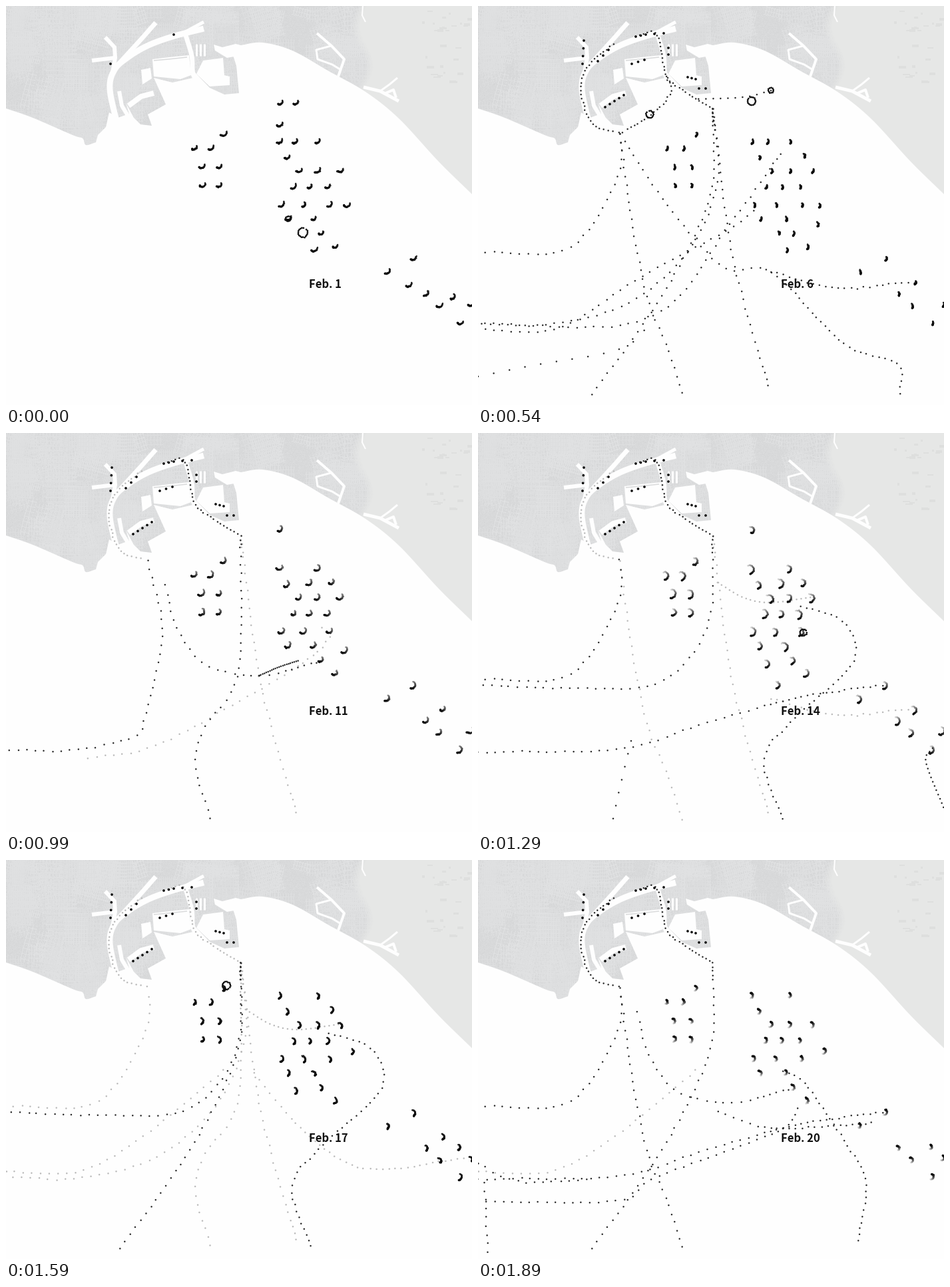
Animation of 700x600 px, one loop 2030 ms. Source, as a matplotlib script:

```python
import numpy as np
import matplotlib.pyplot as plt
from matplotlib.animation import FuncAnimation
from matplotlib.patches import Polygon

W, H, DPI = 700, 600, 100
PT = 72 / DPI
LOOP, STEP = 2030, 10
SEA, LAND = "#fefefe", "#d9dadb"
BLACK, DARK, FAINT = .04, .16, .73

plt.rcParams["toolbar"] = "None"
fig = plt.figure(figsize=(W / DPI, H / DPI), dpi=DPI, facecolor=SEA)
ax = fig.add_axes([0, 0, 1, 1])
ax.axis("off")


def spline(points, steps=12):
    """Smooth Catmull-Rom curve through the points."""
    p = np.array(points, float)
    p = np.vstack([2 * p[0] - p[1], p, 2 * p[-1] - p[-2]])
    t = np.linspace(0, 1, steps)[:, None]
    return np.vstack([.5 * (2 * b + (c - a) * t + (2 * a - 5 * b + 4 * c - d) * t**2
                            + (3 * b - a - 3 * c + d) * t**3)
                      for a, b, c, d in zip(p, p[1:], p[2:], p[3:])])


# ---- map -------------------------------------------------------------
def area(color, *points):
    return ax.add_patch(Polygon(points, closed=True, fc=color, ec="none"))


def stroke(width, *points, color=SEA):
    ax.plot(*zip(*points), color=color, lw=width * PT,
            solid_capstyle="butt", solid_joinstyle="round")


def street_texture():
    rng = np.random.default_rng(4)
    y, x = np.mgrid[:290, :W]
    tone = 216.5 + rng.normal(0, 1.8, x.shape)
    for _ in range(330):
        cx, cy = rng.uniform(0, 545), rng.uniform(0, 215)
        w, h = rng.uniform(6, 32, 2)
        angle = rng.choice([0, 0, 0, .25, -.3])
        u = (x - cx) * np.cos(angle) + (y - cy) * np.sin(angle)
        v = (y - cy) * np.cos(angle) - (x - cx) * np.sin(angle)
        gap = rng.integers(3, 7)
        lines = (u % gap < 1) | (v % (gap + 2) < 1)
        tone[(abs(u) < w) & (abs(v) < h) & lines] = rng.uniform(220, 225)
    plain = np.clip((x - 528 + 10 * np.sin(y / 19)) / 14, 0, 1)
    tone = tone * (1 - plain) + 230.5 * plain
    for _ in range(28):
        cx, cy = rng.integers(625, 695), rng.integers(5, 115)
        tone[cy:cy + rng.integers(2, 5), cx:cx + rng.integers(3, 12)] = 222
    rgb = np.stack([tone, tone + 1, tone + 2 - 2 * plain], -1)
    return rgb.clip(0, 255).astype(np.uint8)


west_coast = [(0, 154), (40, 168), (100, 194), (115, 199), (120, 209), (135, 205)]
port = [(138, 194), (150, 182), (155, 160), (168, 168), (185, 162), (180, 146), (192, 168),
        (202, 178), (219, 180), (213, 163), (240, 148), (222, 108), (250, 115), (281, 108),
        (284, 100), (306, 123), (328, 133), (350, 131), (346, 90), (340, 71)]
east_coast = [(352, 59), (385, 55), (430, 67), (485, 98), (540, 129), (590, 169),
              (650, 234), (700, 283)]
coast = area("none", (0, 0), *spline(west_coast), *port, *spline(east_coast), (700, 0))
ax.imshow(street_texture(), extent=(0, W, 290, 0), interpolation="nearest",
          aspect="auto").set_clip_path(coast)

# channels and basins of the port
stroke(9, *spline([(168, 182), (156, 125), (163, 96), (182, 78), (212, 60), (250, 46), (297, 34)]))
stroke(6, (160, 100), (164, 78), (163, 62), (149, 47))
stroke(6, (129, 82), (163, 78))
stroke(7, (172, 84), (203, 50), (225, 25))
stroke(5, (262, 43), (297, 24))
stroke(7, *spline([(270, 44), (279, 75), (282, 105), (300, 122)]))
for x in (286, 292, 298):
    stroke(3, (x, 57), (x, 75))
area(SEA, (220, 80), (245, 77), (275, 74), (278, 104), (262, 110), (222, 106))
stroke(1.5, (222, 82), (244, 80), (272, 77), color=LAND)
area(SEA, (203, 96), (217, 93), (219, 109), (205, 118))
stroke(8, (184, 150), (203, 136), (222, 131))
stroke(6, (170, 128), (174, 150), (185, 168))
area(SEA, (296, 82), (326, 78), (328, 104), (336, 106), (336, 119), (306, 121), (286, 102))
area(SEA, (312, 58), (325, 62), (345, 57), (357, 60), (353, 74), (332, 78), (314, 67))
# marinas on the eastern shore
stroke(4, (467, 41), (489, 60), (508, 80), (498, 109))
stroke(3, (488, 60), (466, 66), (468, 80), (490, 88), (503, 96))
stroke(5, (537, 122), (562, 128), (590, 143))
stroke(3, (562, 128), (576, 118), (588, 108))
stroke(4, (568, 132), (582, 126), (586, 138))
stroke(2, (536, 0), (535, 14), (540, 24))


# ---- sailing ships: dotted wakes along shared lanes --------------------
lanes = []


def lane(dark, faint, *points, gap=None):
    """A lane with the days on which its wake is dark or faint.

    Ships leave dots at even times, so dots crowd where ships are slow.
    """
    line = spline(points)
    x, y = line.T
    speed = gap or np.where((y < 188) & (x < 360), 6, np.where(x > 430, 9.5, 13))
    pace = np.broadcast_to(speed, x.shape)[1:]
    clock = np.r_[0, (np.hypot(np.diff(x), np.diff(y)) / pace).cumsum()]
    ticks = np.arange(0, clock[-1])
    dots = np.c_[np.interp(ticks, clock, x), np.interp(ticks, clock, y)]
    dots += np.random.default_rng(len(dots)).normal(0, .1 if gap else .6, dots.shape)
    lanes.append((dots, dark, faint))


HARBOUR_W, HARBOUR_E = (213, 192), (353, 155)
# in and out of the two harbour mouths
lane((3, 6, 20), (11, 14, 17), (203, 57), (165, 90), (155, 130), (172, 177), HARBOUR_W)
lane((3, 6, 11, 14, 20), (17,), (237, 46), (268, 42), (283, 105), (305, 125), HARBOUR_E)
lane((6, 14, 20), (17,), HARBOUR_W, (213, 245), (175, 325), (120, 370), (0, 370))
lane((6, 20), (14,), HARBOUR_W, (235, 350), (258, 450), (285, 515), (307, 583))
lane((3,), (), (240, 213), (278, 350), (270, 395), (210, 470), (206, 592))
lane((3,), (), HARBOUR_W, (245, 230), (268, 243), (335, 200), (345, 290), (270, 405),
     (118, 515), (72, 568), (83, 594))
lane((11,), (), HARBOUR_W, (235, 300), (208, 430), (195, 455), (110, 476), (0, 477))
lane((3, 6), (17,), HARBOUR_E, (360, 260), (322, 360), (230, 445), (110, 478), (0, 477))
lane((6, 17, 20), (), HARBOUR_E, (350, 280), (300, 395), (230, 505), (170, 585))
lane((14, 17), (), HARBOUR_E, (345, 290), (270, 376), (120, 383), (0, 379))
lane((11,), (17,), HARBOUR_E, (349, 360), (300, 440), (285, 500), (307, 580))
lane((6,), (11, 14, 17), HARBOUR_E, (372, 310), (390, 410), (438, 578))
lane((6,), (), (283, 105), (290, 130), (258, 165), HARBOUR_W)
lane((6,), (), HARBOUR_W, (285, 300), (370, 393), (440, 400), (550, 508), (630, 538), (634, 583))
# between the anchorages and the open sea
lane((11, 20), (), (240, 230), (255, 290), (300, 348), (380, 365), (475, 343))
lane((14, 20), (3,), (0, 480), (215, 475), (330, 440), (480, 398), (612, 379))
lane((14, 17), (), (485, 260), (550, 285), (563, 345), (480, 425), (430, 490), (458, 582))
lane((3,), (), (377, 317), (420, 380), (462, 398), (540, 383), (614, 381))
lane((3,), (), (212, 465), (300, 425), (388, 408))
lane((3,), (), (388, 408), (387, 440), (403, 465), gap=2)
lane((3,), (), (403, 465), (425, 510), (460, 585), gap=7)
lane((3,), (), (571, 402), (605, 490), (625, 575), gap=7)
lane((3,), (), (118, 508), (165, 540), (220, 592), gap=1.5)
lane((), (3, 14, 17), (360, 225), (400, 248), (440, 255), (500, 247), gap=7)
lane((6,), (14,), (440, 400), (540, 424), (650, 415))
lane((), (17,), (372, 320), (450, 410), (540, 464), (695, 448))
lane((), (17, 20), (0, 468), (110, 468), (200, 420), (335, 310))
lane((6,), (), (415, 308), (370, 340), (240, 410), (120, 485), (0, 486))
lane((6,), (), (455, 222), (380, 325), (255, 470), (0, 479))
lane((6,), (), (0, 557), (85, 540), (215, 515), (265, 470), gap=24)
lane((6,), (), (440, 127), (400, 137), (330, 140), gap=11)
lane((11,), (), (380, 365), (410, 352), (440, 342), gap=3)
lane((), (11,), (474, 293), (485, 310), (440, 350), (330, 415), (220, 472), (118, 490))
lane((14,), (), (230, 463), (212, 538), (203, 580), gap=20)
lane((14,), (), (683, 474), (673, 495), (700, 565), gap=7)
lane((20,), (), (458, 318), (490, 335), (555, 430), (583, 485), (570, 577))
lane((20,), (), (480, 374), (450, 408), (265, 478), (210, 512), (0, 514))
lane((20,), (), (360, 378), (440, 403), (592, 396))
lane((20,), (), (0, 457), (60, 483), (170, 481))
lane((20,), (), (10, 485), (15, 592))


def wakes(day, u, prev, nxt):
    """Old wakes shrink and pale while new ones grow."""
    for dots, dark, faint in lanes:
        cut = int(len(dots) * u)
        for when, part, fade in ((prev, dots[cut:], .4 * u), (nxt, dots[:cut], 0)):
            if when in dark + faint:
                shade = DARK if when in dark else FAINT
                yield part, np.full(len(part), min(shade + fade, .82)), np.full(len(part), 2.5)


# ---- anchored ships: arcs that swing with wind and tide ----------------
ANCHORAGE = [  # y of a row, then the x of its berths
    (193, 328), (214, 284, 309), (242, 295, 321), (270, 296, 321),
    (204, 412, 469), (228, 423), (248, 441, 469, 503), (272, 433, 457, 484),
    (299, 415, 448, 487), (320, 425, 463), (342, 474), (362, 495),
    (380, 613), (400, 574), (433, 632), (451, 652), (477, 683), (449, 699)]
VISITORS = [  # x, y, first and last day
    (413, 146, 1, 1), (436, 146, 1, 1), (412, 179, 1, 1), (435, 204, 1, 8), (490, 225, 3, 17),
    (457, 226, 11, 14), (513, 300, 1, 8), (510, 328, 3, 11), (452, 341, 2, 6), (464, 367, 1, 6),
    (606, 420, 1, 3), (672, 438, 1, 3), (657, 416, 6, 17), (413, 145, 11, 14),
    (436, 347, 14, 17), (452, 379, 14, 15), (521, 288, 17, 20), (681, 432, 17, 20)]
CIRCLING = [  # x, y, radius, first and last day
    (424, 320, 4, 1, 1), (446, 341, 7, 1, 1), (258, 163, 5.5, 2, 8), (440, 127, 4, 2, 8),
    (411, 143, 6, 5, 8), (489, 300, 5, 14, 14), (331, 189, 6, 17, 17)]
KEYS = (1, 3, 6, 11, 14, 17, 20)
HEADING = (55, -38, 0, 38, -5, -10, 12)
SWING = (140, 135, 100, 175, 190, 140, -175)
RADIUS = (5, 4.5, 4.2, 4.8, 5.8, 4.8, 3.8)
TAIL = (.1, .1, .1, .5, .8, .1, .85)


def anchored(day):
    heading, swing, radius, tail = (np.interp(day, KEYS, v) for v in (HEADING, SWING, RADIUS, TAIL))
    rng = np.random.default_rng(day)
    berths = [(x, y) for y, *xs in ANCHORAGE for x in xs]
    berths += [(x, y) for x, y, first, last in VISITORS if first <= day <= last]
    age = np.linspace(1, 0, 14)
    for berth in berths:
        middle = np.radians(heading + rng.normal(0, 12))
        r = radius * rng.uniform(.8, 1.12)
        a = middle + np.radians(swing) * (.5 - age)
        center = np.array(berth) - .7 * r * np.array([np.cos(middle), np.sin(middle)])
        reach = r + rng.normal(0, .35, (len(a), 1))
        yield (center + reach * np.c_[np.cos(a), np.sin(a)],
               BLACK + tail * age**1.4, 3.4 - .9 * age)
    for x, y, r, first, last in CIRCLING:
        if first <= day <= last:
            a = np.arange(0, 5.8, 2.3 / r) + rng.uniform(0, 6)
            reach = r + rng.normal(0, .3, len(a))
            yield (np.c_[x + reach * np.cos(a), y + reach * np.sin(a)],
                   np.full(len(a), BLACK), np.full(len(a), 2.7))


# ---- moored ships: even rows along the quays ---------------------------
QUAYS = [((157, 87), (159, 52), 4), ((252, 43), (237, 46), 3), ((265, 42), (279, 41), 2),
         ((286, 63), (286, 73), 2), ((231, 87), (250, 81), 3), ((191, 152), (219, 134), 5),
         ((315, 107), (327, 110), 3), ((332, 124), (342, 124), 2), ((180, 83), (196, 66), 3)]


def moored(day):
    spots = np.vstack([np.linspace(a, b, n) for a, b, n in QUAYS])
    if day == 1:
        spots = spots[[0, 4]]
    elif day <= 3:
        spots = spots[::2]
    return spots, np.full(len(spots), BLACK), np.full(len(spots), 3.7)


def scene(day):
    """Positions, colours and areas of all dots on one day, palest first."""
    prev = max(k for k in KEYS if k <= day)
    nxt = min(k for k in KEYS if k >= day)
    u = (day - prev) / max(nxt - prev, 1)
    groups = [*wakes(day, u, prev, nxt), *anchored(day), moored(day)]
    xy, shade, size = (np.concatenate(part) for part in zip(*groups))
    order = np.argsort(-shade, kind="stable")
    return xy[order], np.repeat(shade[order, None], 3, 1).clip(0, 1), (size[order] * PT)**2


# ---- timing ------------------------------------------------------------
HOLDS = [100, 150, 140] + [150] * 10
STARTS = np.cumsum([0] + HOLDS)
DAYS = [int(1 + t / 100 + .49) for t in STARTS]
SCENES = [scene(day) for day in DAYS]

ships = ax.scatter([], [], lw=0, zorder=5)
label = ax.text(455, 423.5, "", family="Noto Sans CJK JP", weight="bold",
                size=16.6 * PT, color="#111111", va="baseline", zorder=6)
ax.set_xlim(0, W)
ax.set_ylim(H, 0)


def update(frame):
    i = np.searchsorted(STARTS, frame * STEP, side="right") - 1
    xy, colors, sizes = SCENES[i]
    ships.set_offsets(xy)
    ships.set_facecolors(colors)
    ships.set_sizes(sizes)
    label.set_text(f"Feb. {DAYS[i]}")
    return ships, label


anim = FuncAnimation(fig, update, frames=LOOP // STEP, interval=STEP,
                     repeat=True, repeat_delay=0, blit=False)
plt.show()
```
